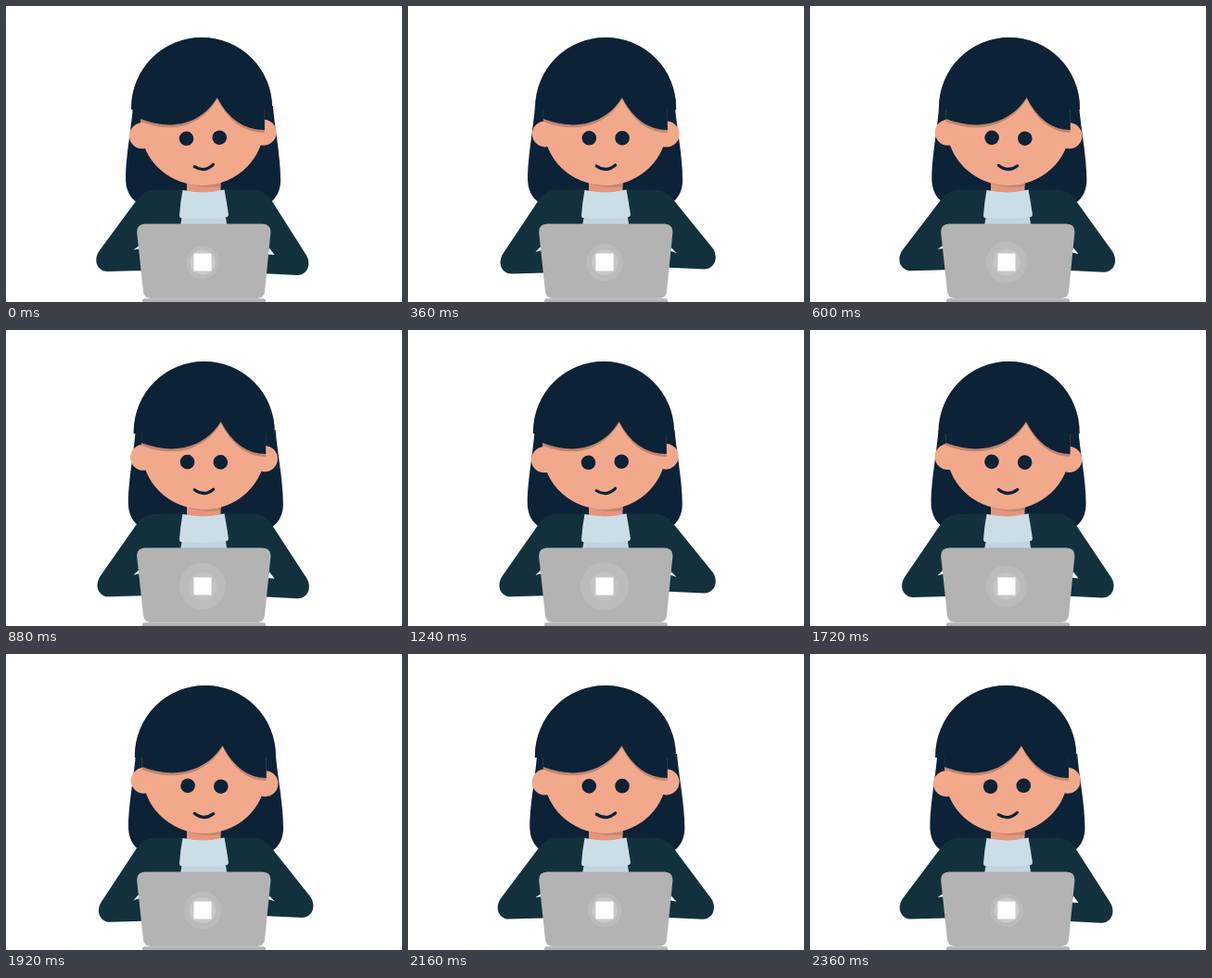
Recreate the animation shown at these times as an HTML page. Size 427 by 320 pixels, loop 2400 ms.

```html
<!DOCTYPE html>
<html lang="en">
<head>
<meta charset="utf-8">
<title>Working at a laptop</title>
<style>
  html, body { margin: 0; width: 100%; height: 100%; overflow: hidden; background: #fff; }
  svg { display: block; width: 100vw; height: 100vh; }
</style>
</head>
<body>
<svg viewBox="0 0 427 320">
  <path id="backHair" fill="#0c2237" d="M138 108C137 128 130.200 162 130.200 187C130.200 205 142 217 158 217H270C287 217 297.200 205 297.200 188C297.200 162 290.500 130 289 108Z"/>

  <g fill="#12313d">
    <path d="M147 208Q151 199 162 199L190 198.500H237L266 199Q277 199 282 206L276 300H152Z"/>
    <path id="leftArm"/>
    <path id="rightArm"/>
  </g>
  <g fill="#fff">
    <path id="leftGap"/>
    <path id="rightGap"/>
  </g>

  <path fill="#e6957d" d="M195 180H231.500V208H195Z"/>
  <path fill="#c08872" d="M195 180H231.500V195Q213 198 195 192Z"/>
  <path fill="#c2d5df" d="M191 222H236L239 242H187Z"/>
  <path fill="#cbdee7" d="M190.500 199Q213 204 235.500 198.500Q238 212 240 226Q239 229 235 228.500Q213 231 191 229Q187 230 187 226Q188 212 190.500 199Z"/>

  <g id="head" fill="#f2a98b">
    <circle cx="147.800" cy="138.500" r="14"/>
    <circle cx="278.600" cy="138.500" r="14"/>
    <ellipse cx="212.800" cy="130" rx="66.500" ry="64"/>
    <g fill="#0c2237">
      <circle cx="195.300" cy="142.800" r="7.800"/>
      <circle cx="231" cy="142.700" r="7.800"/>
    </g>
  </g>
  <path id="mouth" d="M203.300 172.500Q213.500 180.500 223.700 172.500" fill="none" stroke="#0c2237" stroke-width="3.200" stroke-linecap="round"/>

  <path id="hairShadow" fill="#bd8770"/>
  <path id="hair" fill="#0c2237"/>

  <g fill="#b3b3b3">
    <path d="M150 235.500H276.500Q286 236 285.400 245L279 308.500Q278 316 271 316H156Q149 316 148 308.500L141.200 245Q140.500 236 150 235.500Z"/>
    <path d="M147 318.300Q147 316.300 150 316.300H277Q280 316.300 280 318.300V320H147Z"/>
  </g>
  <g fill="#fff">
    <circle id="outerGlow" cx="212" cy="277" fill-opacity=".1"/>
    <circle id="innerGlow" cx="212" cy="277"/>
    <rect x="202.500" y="267.500" width="19" height="19"/>
  </g>
</svg>
<script>
const part = id => document.getElementById(id);
const set = (id, name, value) => part(id).setAttribute(name, value);
// Swings from -1 to 1, lowest at the given start time
const swing = (time, period, start) => -Math.cos((time - start) / period * 2 * Math.PI);

// Crown arc closed by two fringe curves; drop lowers the fringe for its shadow
function hairPath(sway, drop) {
  const crown = 213 + sway * 2;
  const left = 145.800 + sway * 0.800, right = 279.800 + sway;
  const parting = 230.600 + sway * 3;
  return `M${left} ${122 + drop}V112H${crown - 76}V110A76 76 0 0 1 ${crown + 76} 110V112H${right}V${134 + drop}` +
    `Q${parting + 18} ${134 + drop} ${parting} ${99 + drop / 2}` +
    `C${parting - 15} ${124 + drop} ${left + 39} ${137 + drop} ${left} ${122 + drop}Z`;
}

function draw(time) {
  const sway = swing(time, 1200, 50);
  set("head", "transform", `rotate(${sway * 1.600} 213 172)`);
  set("mouth", "transform", `rotate(${sway * 4 - 3} 213.500 174)`);
  set("hair", "d", hairPath(sway, 0));
  set("hairShadow", "d", hairPath(sway, 3));
  set("backHair", "transform", `translate(${swing(time, 1200, 180) * 1.900})`);

  const leftMove = swing(time, 800, -140);
  let x = 98.200 + leftMove * 2, y = 288 + leftMove * 2;
  set("leftArm", "d", `M160 199Q149 199 141.500 209L${x + 3} ${y - 22}C${x - 4} ${y - 11} ${x + 2} ${y} ${x + 12} ${y}L165 ${y - 1.500}V215Z`);
  set("leftGap", "d", `M137.500 ${264.500 + leftMove * 2}L144.500 258.500V${263 + leftMove}Z`);

  const rightMove = swing(time, 800, 0);
  x = 328.900 + rightMove * 2.800;
  y = 287.700 - rightMove * 3.300;
  set("rightArm", "d", `M266 199Q278 199 285 208L${x - 2.500} ${y - 22}C${x + 4} ${y - 11} ${x - 2} ${y} ${x - 12} ${y}L265 ${y - 2.500}V215Z`);
  set("rightGap", "d", `M284 261.500L289.500 ${268 - rightMove}L282 ${266.500 - rightMove * 2}Z`);

  const pulse = swing(time, 2400, -40);
  set("outerGlow", "r", 22 + pulse * 4.200);
  set("innerGlow", "r", 14.500 + pulse);
  set("innerGlow", "fill-opacity", 0.160 - pulse * 0.060);
}

const start = performance.now();
function tick() {
  draw((performance.now() - start) % 2400);
  requestAnimationFrame(tick);
}
tick();
</script>
</body>
</html>
```
